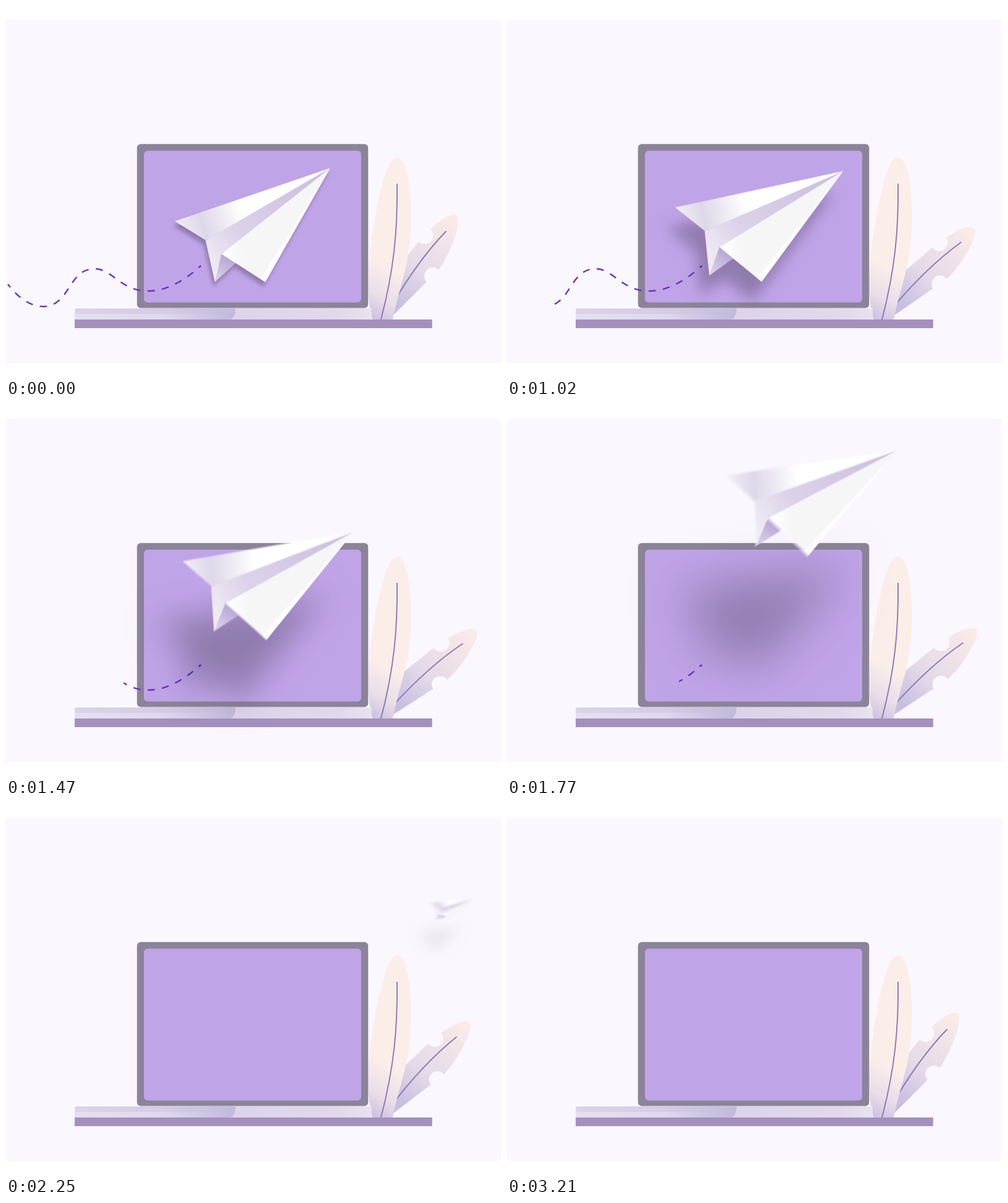
These frames come from a looping animation (800x600 px, 3240 ms). An HTML page with a canvas:

```html
<!DOCTYPE html>
<html lang="en">
<head>
<meta charset="utf-8">
<title>Paper plane</title>
<style>
html, body { margin: 0; width: 100%; height: 100%; overflow: hidden; background: #fff; }
canvas { display: block; }
</style>
</head>
<body>
<canvas id="stage" width="800" height="600"></canvas>
<script>
const LOOP = 3240;
const ctx = document.getElementById('stage').getContext('2d');

function layer(w, h) {
  const c = document.createElement('canvas');
  c.width = w;
  c.height = h;
  return c.getContext('2d');
}

function gradient(c, x0, y0, x1, y1, ...stops) {
  const g = c.createLinearGradient(x0, y0, x1, y1);
  stops.forEach(([at, color]) => g.addColorStop(at, color));
  return g;
}

function polygon(...points) {
  const p = new Path2D();
  points.forEach(([x, y]) => p.lineTo(x, y));
  p.closePath();
  return p;
}

function fill(c, path, style) {
  c.fillStyle = style;
  c.fill(path);
}

function stroke(c, path, style, width) {
  c.strokeStyle = style;
  c.lineWidth = width;
  c.stroke(path);
}

const rad = d => d * Math.PI / 180;
const clamp = u => Math.min(1, Math.max(0, u));
const smooth = u => {
  u = clamp(u);
  return u * u * (3 - 2 * u);
};

// Smooth curve through [time, value] keys, resting at both ends
function curve(...keys) {
  const last = keys.length - 1;
  const slope = i => i === 0 || i === last ? 0 :
    (keys[i + 1][1] - keys[i - 1][1]) / (keys[i + 1][0] - keys[i - 1][0]);
  return t => {
    if (t <= keys[0][0]) return keys[0][1];
    if (t >= keys[last][0]) return keys[last][1];
    const i = keys.findIndex(k => k[0] > t) - 1;
    const [t0, a] = keys[i], [t1, b] = keys[i + 1];
    const d = t1 - t0, u = (t - t0) / d, v = 1 - u;
    return a * v * v * (1 + 2 * u) + b * u * u * (1 + 2 * v) +
      d * u * v * (slope(i) * v - slope(i + 1) * u);
  };
}

// ---- plane ----
const LIFT = 1250, SHRINK = 1750, GONE = 2325;
const SHUTTER = 15;
const PIVOT = [388.25, 375.5];
const NOSE = [524, 262], LEFT = [273, 348], MID = [323, 379], KEEL = [338, 446];
const INNER = [348, 401], TUCK = [372, 415], RIGHT = [419, 446.5];
const silhouette = polygon(NOSE, LEFT, MID, KEEL, TUCK, RIGHT);

const planeX = t => PIVOT[0] + 325 * Math.pow(Math.max(0, t - LIFT) / 1000, 2.15);
const planeY = curve([650, PIVOT[1]], [1020, 368.5], [1470, 301], [1770, 165], [1900, 137], [2430, 185]);
const planeTurn = curve([0, 0], [540, 2.2], [1020, 6.7], [1770, 10.6], [2350, 13]);
const planeSize = t => (1 + .057 * smooth(t / 1400)) *
  (1 - Math.pow(clamp((t - SHRINK) / (GONE - SHRINK)), 2));

const SPRITE = { x: 264, y: 252, w: 270, h: 204 };

function makeSprite() {
  const c = layer(SPRITE.w * 2, SPRITE.h * 2);
  c.scale(2, 2);
  c.translate(-SPRITE.x, -SPRITE.y);
  fill(c, polygon(INNER, TUCK, KEEL),
    gradient(c, 362, 402, 340, 444, [0, '#b3a0d4'], [1, '#ddd4ea']));
  fill(c, polygon(NOSE, MID, KEEL, INNER),
    gradient(c, 324, 408, 500, 280, [0, '#efebf4'], [.3, '#dcd3e9'], [1, '#cdc0e1']));
  stroke(c, polygon(MID, KEEL), 'rgba(255,255,255,.6)', 1.2);
  fill(c, polygon(NOSE, LEFT, MID),
    gradient(c, 283, 366, 383, 335, [0, '#f0edf4'], [.35, '#ded7e9'], [1, '#ffffff']));
  fill(c, polygon(NOSE, INNER, RIGHT),
    gradient(c, 350, 398, 460, 370, [0, '#ffffff'], [.3, '#f6f6f7']));
  fill(c, polygon(NOSE, RIGHT, [411, 441.5]), '#fdfdfe');
  return c.canvas;
}

const sprite = makeSprite();
const blur = layer(800, 600);
blur.imageSmoothingQuality = 'high';

function pose(c, t) {
  const s = planeSize(t);
  c.translate(planeX(t), planeY(t));
  c.rotate(rad(planeTurn(t)));
  c.scale(s, s);
  c.translate(-PIVOT[0], -PIVOT[1]);
}

// The shadow falls further away and softens as the plane lifts
function drawShadow(t) {
  const s = planeSize(t), lift = clamp(t / 1770), away = 3000;
  const gap = (8 + 187 * Math.pow(lift, 3.6)) * s;
  const soft = (3 + 35 * Math.pow(lift, 2.6)) * s;
  ctx.save();
  ctx.shadowColor = `rgba(0,0,0,${.25 * (1 - smooth((t - 1770) / 700))})`;
  ctx.shadowBlur = soft * 2;
  ctx.shadowOffsetX = away - gap * Math.sin(rad(24));
  ctx.shadowOffsetY = gap * Math.cos(rad(24));
  ctx.translate(-away, 0);
  pose(ctx, t);
  fill(ctx, silhouette, '#000');
  ctx.restore();
}

function drawPlane(t) {
  if (t >= GONE) return;
  drawShadow(t);
  // Running average of a few moments while the shutter is open
  const travel = Math.hypot(planeX(t + SHUTTER) - planeX(t), planeY(t + SHUTTER) - planeY(t));
  const n = Math.min(8, Math.max(1, Math.ceil(travel)));
  for (let i = 0; i < n; i++) {
    blur.globalAlpha = 1 / (i + 1);
    blur.globalCompositeOperation = 'destination-out';
    blur.fillRect(0, 0, 800, 600);
    blur.globalCompositeOperation = 'lighter';
    blur.save();
    pose(blur, t + SHUTTER * ((i + .5) / n - .5));
    blur.drawImage(sprite, SPRITE.x, SPRITE.y, SPRITE.w, SPRITE.h);
    blur.restore();
  }
  ctx.drawImage(blur.canvas, 0, 0);
}

// ---- dashed trail ----
const TRAIL = 'M3 450 C18 470 38 486 60 486 C104 486 100 425 143 425 ' +
  'C172 425 185 461 230 461 C262 461 292 441 315 420';
const trail = new Path2D(TRAIL);
const ruler = document.createElementNS('http://www.w3.org/2000/svg', 'path');
ruler.setAttribute('d', TRAIL);
const trailLength = ruler.getTotalLength();

function drawTrail(t) {
  const gone = smooth((t - 570) / 1540);
  if (gone >= 1) return;
  const from = gone > 0 ? ruler.getPointAtLength(gone * trailLength).x : 0;
  ctx.save();
  ctx.beginPath();
  ctx.rect(from, 400, 400, 100);
  ctx.clip();
  ctx.setLineDash([trailLength / 32]);
  ctx.lineDashOffset = 5.2;
  stroke(ctx, trail, '#6a2fc6', 2.4);
  ctx.restore();
}

// ---- leaves ----
const VEIN = '#8c78b4';

const bigLeaf = new Path2D('M632 245 C650 245 657 310 654 365 C651 425 634 460 625 507 ' +
  'L592 507 C580 460 586 400 596 346 C604 300 616 245 632 245 Z');
const bigVein = new Path2D('M632 287.5 C633 363 627 427 606 507');
const bigFill = gradient(ctx, 582, 496, 620, 424, [0, '#cfc4e2'], [.4, '#eadee8'], [1, '#fbeee9']);

const smallLeaf = new Path2D('M626 500 L680 446 A13 13 0 0 1 699 427 C716 403 730 368 731 347 ' +
  'C731 339 728 337 720 338 C708 341 698 350 686 361 A13.3 13.3 0 0 1 667 381 ' +
  'L650 402 L614 446 L612 500 Z');
const smallVein = new Path2D('M711.5 364 Q665 412 620 490');
const smallFill = gradient(ctx, 634, 480, 722, 346, [0, '#c8bfe0'], [.38, '#e4dae8'], [1, '#faebe7']);

function drawLeaves(t) {
  const sway = 12.3 * (smooth(t / 1380) - smooth((t - 1550) / 1640));
  ctx.save();
  ctx.translate(624, 500);
  ctx.rotate(rad(sway));
  ctx.translate(-624, -500);
  fill(ctx, smallLeaf, smallFill);
  stroke(ctx, smallVein, VEIN, 1.9);
  ctx.restore();
  fill(ctx, bigLeaf, bigFill);
  stroke(ctx, bigVein, VEIN, 1.9);
}

// ---- laptop ----
function box(x, y, w, h, r, style) {
  ctx.beginPath();
  ctx.roundRect(x, y, w, h, r);
  ctx.fillStyle = style;
  ctx.fill();
}

const deckLeft = new Path2D('M114 489 H370.5 C371 497 368 505 363 507 H111.5 V492 Q111.5 489 114 489 Z');
const deckFill = gradient(ctx, 370, 0, 590, 0, [0, '#ddd4ea'], [.75, '#e1d9ea'], [1, '#e9e2ee']);
const topFill = gradient(ctx, 111, 0, 370, 0, [0, '#dcd2ea'], [.55, '#d6cce7'], [1, '#c2bbdd']);
const lowFill = gradient(ctx, 111, 0, 370, 0, [0, '#e5e0ef'], [.55, '#dfd9ec'], [1, '#c0b9dc']);

function drawLaptop() {
  box(111.5, 488, 479, 19, [3, 3, 0, 0], '#fefdff');
  box(111.5, 489, 479, 18, [3, 3, 0, 0], deckFill);
  fill(ctx, deckLeft, lowFill);
  ctx.save();
  ctx.clip(deckLeft);
  box(111, 489, 260, 9, 0, topFill);
  ctx.restore();
  box(211.7, 223.3, 373.6, 265.2, 6, '#8b8499');
  box(223, 234, 351, 245.5, 6, '#c0a4e8');
}

function draw(t) {
  box(0, 0, 800, 600, 0, '#fff');
  box(0, 22, 800, 555.5, 0, '#faf7fe');
  drawLeaves(t);
  drawLaptop();
  box(111, 507, 577.7, 14, 0, '#a48fbf');
  drawTrail(t);
  drawPlane(t);
}

const start = performance.now();
function tick() {
  draw((performance.now() - start) % LOOP);
  requestAnimationFrame(tick);
}
tick();
</script>
</body>
</html>
```
